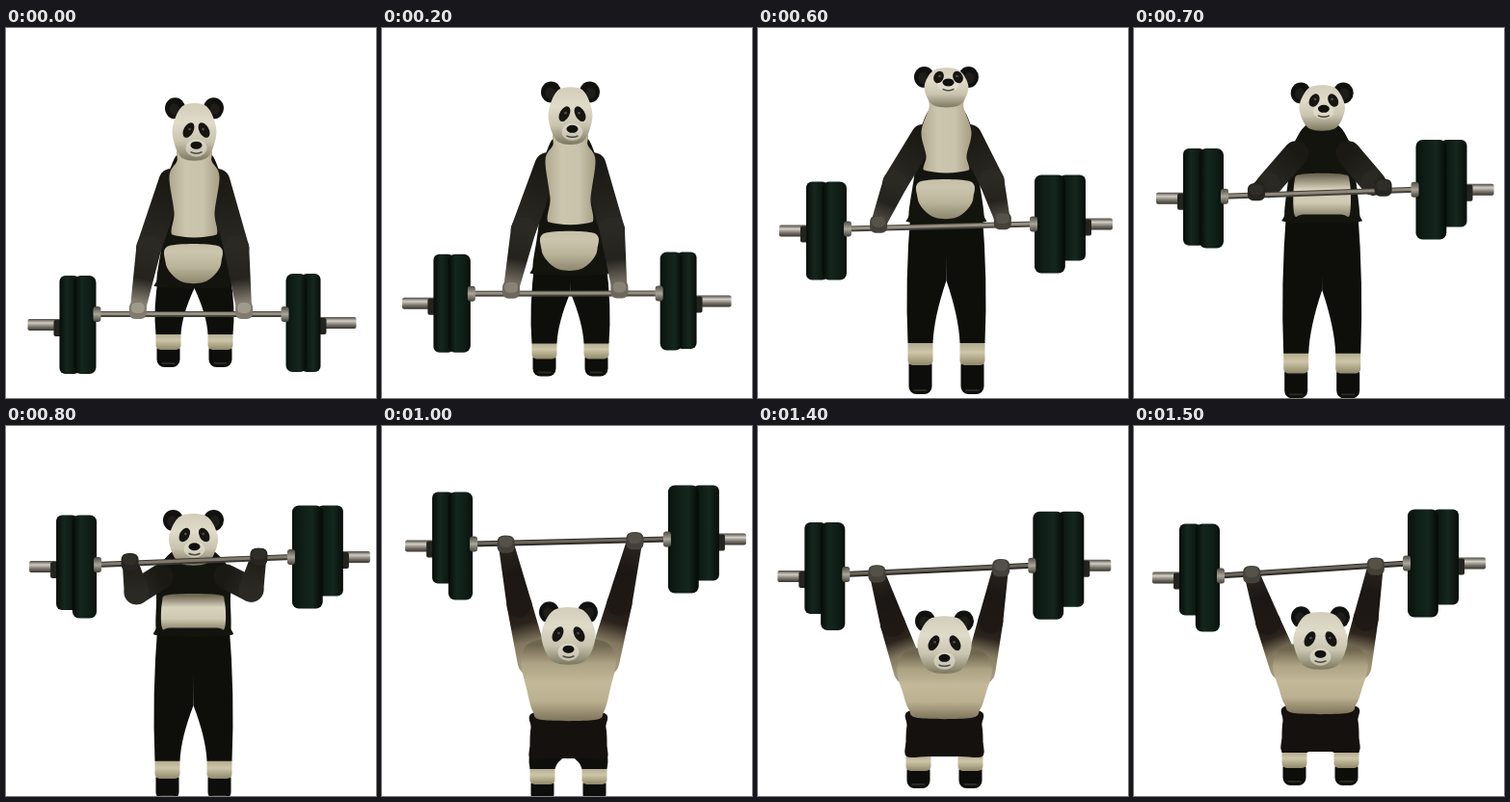
Recreate the animation shown at these times as an HTML page with a canvas. Size 384 by 384 pixels, loop 1.6 s.

```html
<!DOCTYPE html>
<html lang="en">
<head>
<meta charset="utf-8">
<title>Panda lift</title>
<style>
html, body { margin: 0; width: 100%; height: 100%; overflow: hidden; background: #fff; }
canvas { display: block; width: 100vw; height: 100vh; }
</style>
</head>
<body>
<canvas id="stage" width="384" height="384"></canvas>
<script>
const c = document.getElementById('stage').getContext('2d');
const LOOP = 1600, STEP = 100;

// Heights of the body and the place of the bar; everything else follows from these
const POSES = [
  { t: 0, head: 108, waist: 217, crotch: 270, foot: 352, barX: 193, barY: 307, slope: -2 },
  { t: 400, head: 73, waist: 186, crotch: 277, foot: 372, barX: 191, barY: 256, slope: -3 },
  { t: 600, head: 62, waist: 150, crotch: 262, foot: 380, barX: 195, barY: 207, slope: -7 },
  { t: 800, head: 118, waist: 176, crotch: 290, foot: 388, barX: 201, barY: 141, slope: -10 },
  { t: 1000, head: 218, waist: 305, crotch: 340, foot: 390, barX: 201, barY: 121, slope: -7 },
  { t: 1200, head: 235, waist: 314, crotch: 349, foot: 384, barX: 197, barY: 148, slope: -3 },
  { t: 1500, head: 223, waist: 298, crotch: 337, foot: 373, barX: 192, barY: 150, slope: -15 }
];

const clamp = v => Math.max(0, Math.min(1, v));
const mix = (a, b, u) => a + (b - a) * u;
const smooth = u => u * u * (3 - 2 * u);
const peak = (t, at, width) => clamp(1 - Math.abs(t - at) / width);

// Smooth curve through the key poses
function keyed(t) {
  const last = POSES.length - 1;
  let i = 0;
  while (i < last - 1 && t >= POSES[i + 1].t) i++;
  const p = POSES[Math.max(0, i - 1)], a = POSES[i], b = POSES[i + 1], n = POSES[Math.min(last, i + 2)];
  const u = clamp((t - a.t) / (b.t - a.t)), out = {};
  for (const k in a) {
    out[k] = a[k] + u / 2 * (b[k] - p[k] +
      u * (2 * p[k] - 5 * a[k] + 4 * b[k] - n[k] + u * (3 * (a[k] - b[k]) + n[k] - p[k])));
  }
  return out;
}

function poseAt(t) {
  const k = keyed(t);
  const up = smooth(clamp((t - 600) / 400));
  const turn = clamp(t / 600) ** 2;
  const tilt = peak(t, 600, 300);
  const mode = t < 700 ? 'pull' : t < 900 ? 'rack' : 'up';
  const x = 195.5 - 2 * up;
  const shoulder = k.head + 44 - 25 * up, shoulderW = 26 + 20 * up;
  const hip = k.waist + 47 - 21 * up, waistW = 25 + 11 * up;
  const sock = k.foot - 18 - 12 * tilt, ankle = sock - 17 - 7 * tilt;
  const glove = { pull: 160 - t / 8, rack: 48, up: 84 }[mode];

  const span = 341 + 5 * turn + 9 * Math.max(0, Math.sin((t - 600) / 600 * Math.PI));
  const weights = [-1, 1].map(s => {
    const tip = k.barX + s * span / 2, y = k.barY + s * k.slope / 2;
    const outer = tip - s * (s < 0 ? 33 - 5 * turn : 37 - 9 * turn);
    const inner = outer - s * (s < 0 ? 38 + 4 * turn : 36 + 17 * turn);
    return { s, tip, y, outer, inner, seam: mix(outer, inner, 0.4), half: 51 + 5 * up,
      short: s < 0 ? 17 * up : 13 * turn, barY: y - 9 + 9 * turn - (s < 0 ? 2 : 0) };
  });

  const grip = 0.22 - 0.05 * turn, bend = smooth(peak(t, 800, 200));
  const arms = [-1, 1].map(s => {
    const g = s < 0 ? grip : 1 - grip, [l, r] = weights;
    const hand = [mix(l.inner, r.inner, g), mix(l.barY, r.barY, g) - 5 * (1 - up)];
    const top = [x + s * (shoulderW - (mode === 'up' ? 9 : 2)), shoulder + 7];
    const elbow = [(top[0] + hand[0]) / 2 + s * (6 * (1 - up) + 6 * bend), (top[1] + hand[1]) / 2 + 3 + 21 * bend];
    return { top, elbow, hand };
  });
  return { ...k, mode, up, tilt, x, shoulder, shoulderW, hip, waistW, sock, ankle, glove, weights, arms };
}

function gradient(x0, y0, x1, y1, ...colors) {
  const g = c.createLinearGradient(x0, y0, x1, y1);
  colors.forEach((col, i) => g.addColorStop(i / (colors.length - 1), col));
  return g;
}

function oval(x, y, rx, ry, fill, turn = 0) {
  c.beginPath();
  c.ellipse(x, y, rx, ry, turn, 0, 7);
  c.fillStyle = fill;
  c.fill();
}

function box(x0, y0, x1, y1, r, fill) {
  c.beginPath();
  c.roundRect(Math.min(x0, x1), y0, Math.abs(x1 - x0), y1 - y0, r);
  c.fillStyle = fill;
  c.fill();
}

function line(x0, y0, x1, y1, width, color, sag = 0) {
  c.beginPath();
  c.moveTo(x0, y0);
  c.quadraticCurveTo((x0 + x1) / 2, (y0 + y1) / 2 + sag, x1, y1);
  c.lineWidth = width;
  c.strokeStyle = color;
  c.stroke();
}

// Closed smooth curve through points
function blob(pts, fill) {
  const n = pts.length, at = i => pts[(i + n) % n];
  c.beginPath();
  c.moveTo(...pts[0]);
  for (let i = 0; i < n; i++) {
    const p = at(i - 1), a = at(i), b = at(i + 1), q = at(i + 2);
    c.bezierCurveTo(a[0] + (b[0] - p[0]) / 6, a[1] + (b[1] - p[1]) / 6,
      b[0] - (q[0] - a[0]) / 6, b[1] - (q[1] - a[1]) / 6, b[0], b[1]);
  }
  c.fillStyle = fill;
  c.fill();
}

// Symmetric blob from rows of [half width, y]
function mirrored(x, rows, fill) {
  blob([...rows.map(([w, y]) => [x + w, y]), ...rows.map(([w, y]) => [x - w, y]).reverse()], fill);
}

function limb([x0, y0], r0, [x1, y1], r1, fill) {
  const a = Math.atan2(y1 - y0, x1 - x0) + Math.PI / 2;
  c.beginPath();
  c.arc(x0, y0, r0, a, a + Math.PI);
  c.arc(x1, y1, r1, a + Math.PI, a + 2 * Math.PI);
  c.fillStyle = fill;
  c.fill();
}

const fur = v => `rgb(${v},${v * 0.96},${v * 0.86})`;

function drawLegs({ x, hip, crotch, ankle, sock, foot }) {
  for (const s of [-1, 1]) {
    const outer = x + s * 40, inner = x + s * 14;
    box(outer - s, sock - 4, inner + s, foot, [4, 4, 8, 8], '#0d0d0b');
    line(outer - s * 6, foot - 4, inner + s * 6, foot - 4, 2, '#2b2924');
    box(outer, ankle - 3, inner, sock, 5, gradient(0, ankle - 3, 0, sock, '#a39c7e', '#cdc6a8', '#8f8868'));
    c.beginPath();
    c.moveTo(x - s, hip - 8);
    c.lineTo(x + s * 37, hip - 8);
    c.quadraticCurveTo(x + s * 43, mix(hip, ankle, 0.5), outer, ankle + 1);
    c.lineTo(inner, ankle + 1);
    c.quadraticCurveTo(x + s * 13, mix(crotch, ankle, 0.6), x, crotch);
    c.fillStyle = '#0e0f0b';
    c.fill();
  }
}

function drawBack({ x, shoulder: sy, shoulderW: sw, waist, waistW: ww, hip }) {
  mirrored(x, [[14, sy - 24], [sw, sy - 4], [sw + 6, sy + 14], [ww + 8, waist], [39, hip - 4], [35, hip + 5]], '#14140f');
}

function drawCoat({ mode, x, head, tilt, shoulder: sy, shoulderW: sw, waist, waistW: ww, hip }) {
  if (mode === 'up') {
    mirrored(x, [[ww - 2, waist - 8], [ww + 3, waist + 8], [40, hip], [39, hip + 14], [17, hip + 14]], '#15110e');
    mirrored(x, [[sw - 14, sy - 15], [sw + 3, sy + 4], [ww + 7, mix(sy, waist, 0.55)], [ww + 1, waist - 9], [ww - 9, waist]],
      gradient(0, sy - 10, 0, waist, '#6f664f', '#aca284', '#c3b999', '#bbb090', '#81775d'));
    return;
  }
  const cream = gradient(x - 28, 0, x + 28, 0, '#aaa58b', '#cbc6ae', '#c8c2ab', '#a09a80');
  if (mode === 'rack') {
    mirrored(x, [[ww - 6, waist - 1], [ww + 2, waist + 7], [ww + 2, hip - 3], [ww - 8, hip - 3]],
      gradient(0, waist, 0, hip, '#6f6954', '#d8d2bd', '#cfc8b0', '#857e67'));
    return;
  }
  const neck = head + 24 - 9 * tilt;
  mirrored(x, [[16, neck - 6], [18, neck + 6], [sw, sy + 2], [ww - 4, mix(sy, waist, 0.6)], [ww - 4, waist]], cream);
  line(x - ww - 2, waist + 1, x + ww + 2, waist + 1, 9, '#14140f', 8);
  mirrored(x - 1, [[ww, waist + 9], [ww + 4, mix(waist, hip, 0.55)], [ww - 2, hip - 9], [10, hip]],
    gradient(0, waist, 0, hip, '#c0bba2', '#cbc5ae', '#b9b399', '#8f896f'));
}

function drawArm({ top, elbow, hand }, mode, v) {
  if (mode === 'up') {
    limb(top, 16, elbow, 13, gradient(...elbow, ...top, '#1f1915', '#2b231c', '#81775e', '#a1967a'));
    limb(elbow, 13, hand, 8, gradient(...elbow, ...hand, '#1f1915', '#1b1714', '#2d2621'));
    return;
  }
  const end = mode === 'pull' ? fur(v) : '#1b1a16';
  limb(top, 13, elbow, 13, gradient(...top, ...elbow, '#1a1914', '#2b2923'));
  limb(elbow, 13, hand, 8, gradient(...elbow, ...hand, '#2b2923', '#25231e', end));
}

function drawHead({ x, head: y, up, tilt, mode }) {
  const rx = 22 + 5 * up, ry = 29 - 9 * tilt, earY = y - ry * 0.85 + 6 * tilt;
  for (const s of [-1, 1]) {
    oval(x + s * (20 + 3 * tilt), earY, 10.5, 11, '#11110f');
    oval(x + s * (21 + 3 * tilt), earY + 1, 5, 6, '#1f1d1a');
  }
  mirrored(x, [[rx * 0.5, y - ry * 0.96], [rx * 0.97, y - ry * 0.35], [rx, y + ry * 0.25], [rx * 0.55, y + ry * 0.94]],
    gradient(0, y - ry, 0, y + ry, '#d3cebb', '#dfdbc9', '#c9c4ae', '#7f7a62'));
  const fx = x + 2 * (1 - up), eyeY = y - 2 - 9 * tilt, nose = y + ry * 0.47 - 15 * tilt;
  oval(fx, nose + 3, 11, 9 - 2 * tilt, 'rgba(232,228,214,.6)');
  for (const s of [-1, 1]) {
    const ex = fx + s * (8 + 3 * up + 2 * tilt);
    oval(ex, eyeY, 5, 8.5 - 2 * tilt, '#161512', s * -0.5);
    oval(ex - s, eyeY - 1, 1.3, 1.3, '#55514a');
  }
  oval(fx, nose, 6, 4, '#11110f');
  line(fx - 6, nose + 7, fx + 6, nose + 7, 1.5, '#4d483d', 3);
}

function drawWeight({ s, tip, y, outer, inner, seam, half, short, barY }) {
  box(tip, y - 6, outer - s * 4, y + 6, 2, gradient(0, y - 6, 0, y + 6, '#4b4842', '#d2cec5', '#7a766d', '#35332e'));
  box(outer + s * 6, y - 5, outer - s * 3, y + 12, 2, '#232420');
  box(outer, y - half, seam - s * 6, y + half - short, 6, gradient(outer, 0, seam, 0, '#070e0a', '#15271e', '#0c1912'));
  box(seam, y - half, inner, y + half, 7, gradient(seam, 0, inner, 0, '#050a07', '#14261d', '#0f1f17', '#09120d'));
  box(inner - s * 5, barY - 8, inner + s * 3, barY + 8, 3, gradient(0, barY - 8, 0, barY + 8, '#4d4a43', '#aaa69b', '#45423c'));
}

function draw(p) {
  const [l, r] = p.weights;
  c.fillStyle = '#fff';
  c.fillRect(0, 0, 384, 384);

  drawLegs(p);
  if (p.mode !== 'up') drawBack(p);
  p.arms.forEach(a => drawArm(a, p.mode, p.glove));
  drawCoat(p);
  drawHead(p);

  line(l.inner, l.barY, r.inner, r.barY, 6, fur(70 - 25 * p.up));
  line(l.inner, l.barY - 0.5, r.inner, r.barY - 0.5, 3, fur(150 - 45 * p.up));
  p.weights.forEach(drawWeight);

  for (const { hand: [x, y] } of p.arms) {
    box(x - 9, y - 8, x + 9, y + 10, 6, fur(p.glove * 0.8));
    box(x - 7, y - 7, x + 7, y + 4, 5, fur(p.glove));
  }
}

const start = performance.now();
function tick() {
  const t = (performance.now() - start) % LOOP;
  draw(poseAt(Math.floor(t / STEP) * STEP));
  requestAnimationFrame(tick);
}
tick();
</script>
</body>
</html>
```
